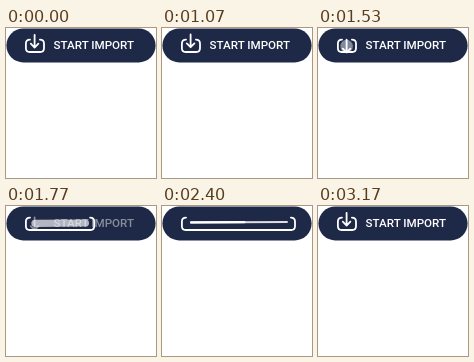
Recreate the animation shown at these times as an HTML page. Size 150x150 px, loop 3.23 s.

```html
<!DOCTYPE html>
<html lang="en">
<meta charset="utf-8">
<title>Import button</title>
<style>
  html, body { margin: 0; width: 100%; height: 100%; overflow: hidden; background: #fff; }
  svg { display: block; width: 150px; height: 150px; }
  text { font: 500 11.6px Roboto, "Open Sans", sans-serif; fill: #fff; }
  path { fill: none; stroke: #fff; stroke-width: 1.8; stroke-linecap: round; stroke-linejoin: round; }
</style>
<svg viewBox="0 0 150 150">
  <rect x=".4" y=".5" width="149.2" height="33.9" rx="16.95" fill="#1e2847"/>
  <text id="label" x="47.6" y="21.2">START IMPORT</text>
  <path id="tray"/>
  <g fill="#fff" transform="rotate(-.3 28 16.5)">
    <rect id="bar"/>
    <rect id="progress" x="28" y="15.2" height="2.4" rx="1.2"/>
  </g>
  <path id="arrow"/>
</svg>
<script>
const LOOP = 3230;
const [label, tray, bar, progress, arrow] =
  ["label", "tray", "bar", "progress", "arrow"].map(id => document.getElementById(id));

// [time, arrow offset]: bob, wind up, drop into the tray, pop out, settle
const BOB = [[-353, 7], [182, -2.4], [717, 7], [1300, -4], [1450, 7], [1560, 4.5],
  [2900, 4.5], [3080, -4], [3170, 0], [LOOP, 0]];

const mix = (a, b, k) => a + (b - a) * k;
const span = (t, from, to) => Math.min(1, Math.max(0, (t - from) / (to - from)));
const smooth = p => (1 - Math.cos(Math.PI * p)) / 2;

function bob(t) {
  const i = BOB.findIndex(key => key[0] > t);
  const [t0, y0] = BOB[i - 1], [t1, y1] = BOB[i];
  return mix(y0, y1, smooth(span(t, t0, t1)));
}

function set(el, attrs) {
  for (const name in attrs) el.setAttribute(name, attrs[name]);
}

function draw(now) {
  const t = now % LOOP;
  const wide = smooth(span(t, 1600, 1930)) - smooth(span(t, 2860, 3130));
  const glow = span(t, 1430, 1530) * (1 - span(t, 3000, 3100));

  const right = mix(38, 133, wide);
  set(tray, { d: `M24 11.6Q19.9 11.6 19.9 15.5V20.3Q19.9 24 23.6 24H${right - 3.7}` +
    `Q${right} 24 ${right} 20.3V15.5Q${right} 11.6 ${right - 4.1} 11.6` });

  const dy = bob(t), tip = 19.5 + dy;
  set(arrow, {
    d: `M28.6 ${6.8 + dy}V${tip}M24.8 ${tip - 3.8}L28.6 ${tip}L32.4 ${tip - 3.8}`,
    opacity: 1 - wide
  });

  // the round glow flattens into the track
  const height = mix(13, 2, wide);
  set(bar, {
    x: mix(22.3, 28, wide),
    y: mix(11.8, 15.4, wide),
    width: mix(12.6, 98, wide),
    height,
    rx: height / 2,
    opacity: mix(0.45, 0.85, wide) * glow
  });
  set(progress, {
    width: 98 * span(t, 2055, 2665),
    opacity: 1 - span(t, 2860, 2930)
  });

  set(label, { opacity: 1 - wide });
}

const start = performance.now();
function frame() {
  draw(performance.now() - start);
  requestAnimationFrame(frame);
}
frame();
</script>
</html>
```
